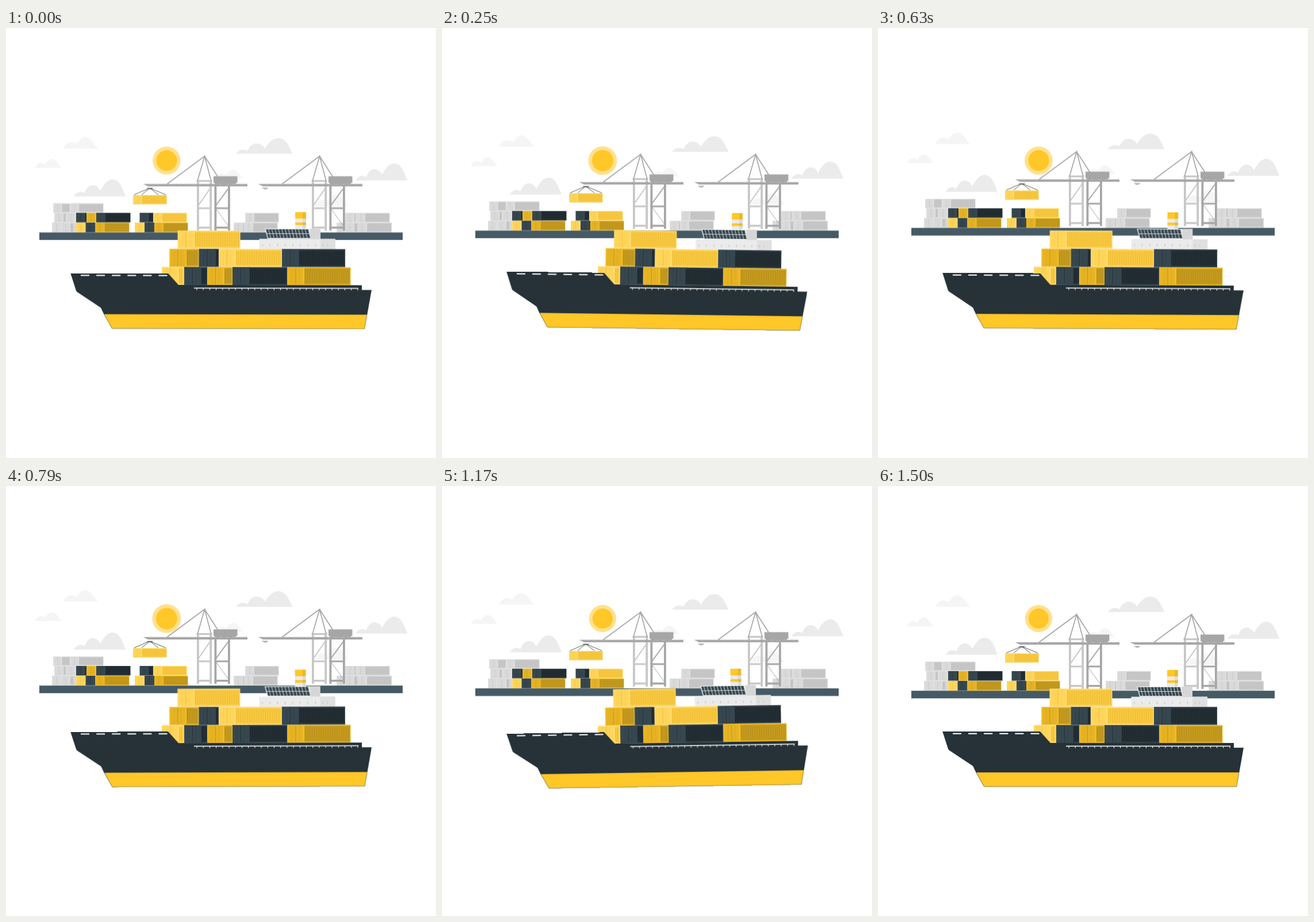
Write an HTML page that moves like this. It is 748 px wide and 748 px high and loops after 1.54 s.

```html
<!DOCTYPE html>
<html lang="en">
<head>
<meta charset="utf-8">
<title>Harbour</title>
<style>
  html, body { margin: 0; width: 100%; height: 100%; overflow: hidden; background: #fff; }
  svg { display: block; width: 100vw; height: 100vh; }
  #sun { transform-origin: 279.4px 230.6px; }
  #ship { transform-origin: 374px 421.5px; }
</style>
</head>
<body>
<svg viewBox="0 0 748 748">
  <g id="clouds"></g>
  <g id="sun">
    <circle cx="279.4" cy="230.6" r="23.6" fill="#ffe08c"/>
    <circle cx="279.4" cy="230.6" r="17.5" fill="#ffc727"/>
  </g>
  <g id="port"></g>
  <g id="ship"></g>
</svg>
<script>
const $ = id => document.getElementById(id);
const DARK = '#263238', YELLOW = '#ffc727', GRAY = '#a6a6a6', PALE = '#c7c7c7';

const rect = (x, y, w, h, fill, extra = '') =>
  `<rect x="${x}" y="${y}" width="${w}" height="${h}" fill="${fill}" ${extra}/>`;
const path = (d, fill, extra = '') => `<path d="${d}" fill="${fill}" ${extra}/>`;
const line = (d, color, width, extra = '') =>
  path(d, 'none', `stroke="${color}" stroke-width="${width}" ${extra}`);

// frame, door, seam, side, rib
const paints = {
  b: ['#ffdc70', '#ffd55a', '#e8bc40', '#ffcf48', '#e3b32c'],
  g: ['#f2bd25', '#e6b323', '#bf951d', '#cca01f', '#ae881a'],
  d: ['#37474f', '#37474f', '#263238', '#263238', '#1b2428'],
  s: ['#e0e0e0', '#dbdbdb', '#bdbdbd', '#cfcfcf', '#b5b5b5']
};

// A container seen from its corner: door on the left, ribbed side on the right
function box(kind, x, y, w, h, door) {
  const [frame, face, seam, side, rib] = paints[kind];
  const k = h / 31, edge = 1.6 * k, end = x + w, low = y + h;
  const dw = Math.min(door, w);
  let out = rect(x, y, w, h, frame) +
    rect(x + edge, y + edge, dw - 2 * edge, h - 2 * edge, face);
  const mid = x + dw / 2;
  out += line(`M${mid} ${y + edge}V${low - edge}`, seam, 0.9 * k + 0.1) +
    line(`M${mid - 6 * k} ${y + edge}V${low - edge}M${mid + 6 * k} ${y + edge}V${low - edge}`, seam, 0.5 * k, 'opacity=".55"');
  if (w > door + 2) {
    const left = x + door;
    out += rect(left + edge / 2, y + edge, w - door - edge, h - 2 * edge, side);
    let ribs = '';
    for (let r = left + 2.6 * k; r < end - edge; r += 3.1 * k) {
      ribs += `M${r.toFixed(2)} ${y + 3.2 * k}V${low - 3.2 * k}`;
    }
    out += line(ribs, rib, 1.1 * k) +
      line(`M${left} ${y}V${low}`, frame, edge);
  }
  return out + line(`M${x} ${low - 0.3}H${end}`, seam, 0.6, 'opacity=".6"');
}

// Each row is a list of [kind, left, right]
const row = (y, h, door, list) =>
  list.map(([kind, a, b]) => box(kind, a, y, b - a, h, door)).join('');

const BIG = 'M0 27C4 21 12 17 20 22C25 11 33 7 41 10C46 11.500 49 15 50 18C57 7 64 0 73 0C87 0 91 13 98 27Z';
const SMALL = 'M0 20C4 13 8 9 12 9C17 8.500 21 10 23.500 12.500C28 5 33 0 39 0C48 0 52 9 61 20Z';
const cloud = (d, x, y, sx, sy, fill) =>
  path(d, fill, `transform="translate(${x} ${y}) scale(${sx} ${sy})"`);

function crane(dx) {
  const legs = (a, b, top, c) =>
    rect(a, top, 3.8, 353 - top, c) + rect(b, top, 3.8, 353 - top, c) +
    rect(a, 312.5, b - a, 3, c) + rect(a, 346, b - a, 3.5, c) +
    line(`M${a + 2} 310L${b + 2} 278`, c, 2);
  return `<g transform="translate(${dx} 0)">` +
    legs(332, 354.3, 265, PALE) + rect(331.5, 265, 27, 3.2, PALE) +
    legs(362.5, 386, 273, GRAY) + line('M366 316L387 345', GRAY, 1) +
    line('M280 272L345.500 223.500L333 267M345.500 223.500L357 267M345.500 223.500L369 260', GRAY, 1.7) +
    rect(361, 258.4, 41.5, 11.4, GRAY) + rect(363, 269, 37, 3, GRAY) +
    path('M238.500 271.800H420V276H247Z', GRAY) +
    line('M250 272.200H420', '#c4c4c4', 0.7, 'stroke-dasharray="7 5"') +
    line('M245.500 278.800H256M248 280.300H254', GRAY, 1.2) + '</g>';
}

$('clouds').innerHTML =
  cloud(SMALL, 99, 190.2, 1, 1, '#f5f5f5') +
  cloud(SMALL, 50, 228.5, 0.76, 0.77, '#f5f5f5') +
  cloud(SMALL, 365, 247.2, 0.77, 0.75, '#f5f5f5') +
  cloud(SMALL, 536, 290.5, 0.98, 1.02, '#f5f5f5') +
  cloud(BIG, 400, 192.2, 1.005, 1, '#ebebeb') +
  cloud(BIG, 118, 264, 0.92, 1.09, '#ebebeb') +
  cloud(BIG, 608, 236.2, 0.92, 1.09, '#ebebeb');

$('port').innerHTML =
  row(305.5, 16, 15, [['s', 82, 111.5], ['s', 111.5, 169.5]]) +
  row(322, 16.5, 15.5, [
    ['s', 84, 105], ['s', 105, 122], ['d', 122, 140], ['g', 140, 157], ['d', 157, 216.5],
    ['d', 232.5, 256], ['b', 256, 314.5], ['s', 416, 474.5], ['s', 590, 609], ['s', 609, 667.5]]) +
  row(339, 16.7, 15.5, [
    ['s', 80, 96], ['s', 96, 118], ['s', 118, 122], ['b', 122, 138.5], ['d', 138.5, 155.5], ['g', 155.5, 214.5],
    ['b', 224, 241], ['d', 241, 258], ['g', 258, 316.5],
    ['s', 396, 414], ['s', 414, 472.5], ['s', 575, 590], ['s', 590, 612], ['s', 612, 671]]) +
  crane(0) + crane(200) +
  line('M246 280.500L223 290.500M248 280.500L236 290.500M252 280.500L265 290.500M254 280.500L278 290.500', DARK, 0.8) +
  line('M245.500 280H254.500', DARK, 1) +
  box('b', 221, 291, 58.5, 16.2, 15.5) +
  rect(58, 356.2, 632, 13.2, '#455a64');

function bridge() {
  let bars = '', ports = '';
  for (let i = 1; i < 13; i++) bars += `M${450.5 + i * 5.8} 349L${455 + i * 5.75} 366`;
  for (let i = 0; i < 9; i++) ports += `M${446 + i * 13.2} 375.500v4`;
  return rect(503, 320, 18.8, 30, '#ebebeb') +
    rect(503, 320, 18.8, 11.3, YELLOW) + rect(503, 338, 18.8, 4.6, YELLOW) +
    rect(516, 320, 5.8, 30, '#000', 'opacity=".07"') +
    rect(440.5, 366.6, 132.5, 17.6, '#ebebeb') + rect(547, 366.6, 26, 17.6, '#e0e0e0') +
    line(ports, '#bdbdbd', 1.1) + line('M559.500 375.500v4', '#bdbdbd', 0.8) +
    path('M450 348.800H547V366.800H455Z', '#e8e8e8') +
    rect(529, 348.8, 18, 17.8, '#d6d6d6') +
    path('M452 350H525.500L529 365H456Z', '#37474f') +
    line(bars, '#e4e8ea', 0.9) + line('M453.500 357.500H527.500', '#e4e8ea', 0.9);
}

function hull() {
  let posts = '';
  for (let x = 332; x < 613; x += 11.2) posts += `M${x} 452.500v3.500`;
  return path('M112.200 427H282L300 447H619V455.300H636L624 523.300H184.500L170.500 498.500L166.500 490C166 488 165 487 163.500 486L125 460.500C123 459 122.300 458.500 121.700 456.500Z', DARK) +
    path('M171 498.200H627.900L623.600 522.700H184.800Z', YELLOW) +
    line('M130 430.700H283', '#fff', 2, 'stroke-dasharray="15 12.100"') +
    line('M327 452.500H613', '#fff', 1.5) + line(posts, '#fff', 1);
}

$('ship').innerHTML = bridge() +
  row(352.5, 31, 28.7, [['b', 298.5, 407.5]]) +
  row(384.2, 31.3, 28.7, [['g', 284.3, 335.5], ['d', 335.5, 370], ['b', 370, 480], ['d', 480, 590]]) +
  row(415.8, 31.4, 28.7, [['b', 271, 310], ['d', 310, 350], ['g', 350, 394], ['d', 394, 489.5], ['g', 489.5, 599.5]]) +
  hull();

// 37 held poses per loop; the slight lead keeps changes on 10 ms ticks
function loop(id, prop, steps) {
  const frames = steps.map(([offset, value]) => ({ offset, transform: `${prop}(${value})` }));
  $(id).animate(frames, { duration: 1540, delay: -5, iterations: Infinity, easing: 'steps(37, start)' });
}

const bob = [[0, '0px,0px'], [0.5, '0px,-9.8px'], [1, '0px,0px']];
loop('clouds', 'translate', bob);
loop('port', 'translate', bob);
loop('ship', 'rotate', [[0, '0deg'], [0.25, '1deg'], [0.75, '-1deg'], [1, '0deg']]);
loop('sun', 'scale', [[0, 1], [0.1, 1.1], [0.3, 1], [0.4, 1], [0.5, 1.1], [0.6, 1], [1, 1]]);
</script>
</body>
</html>
```
